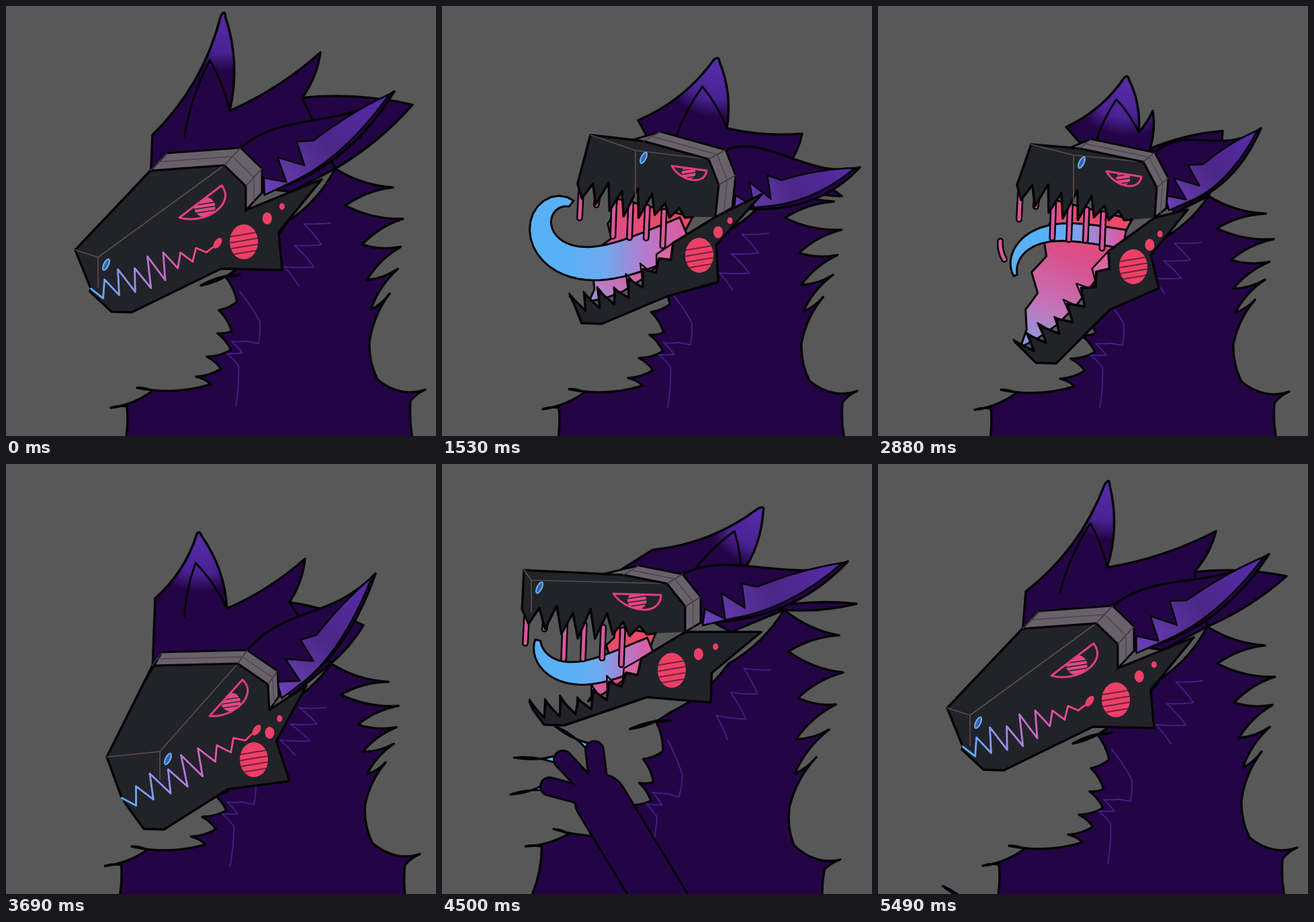
These frames come from a looping animation (640 px wide and 640 px high, 5.58 s). An HTML page with a canvas:

```html
<!DOCTYPE html>
<html lang="en">
<head>
<meta charset="utf-8">
<title>Creature loop</title>
<style>
html, body { margin: 0; width: 100%; height: 100%; overflow: hidden; background: #585858; }
canvas { display: block; width: 100vw; height: 100vh; }
</style>
</head>
<body>
<canvas id="stage" width="640" height="640"></canvas>
<script>
const ctx = document.getElementById('stage').getContext('2d');
const LOOP = 5580, STEP = 90;
const FUR = '#230545', MASK = '#212329', PINK = '#ee3f68', BLUE = '#58b0f6', INK = '#050307', SEAM = '#594d4c';

// Joints of the rig as x y pairs. lean: dx, dy, angle. gape: opening, upper and lower start of the gums.
// tongue: heading, curl, length, half width.
const calm = {
  brow: [103, 363, 215, 245, 325, 237, 357, 268, 357, 304],
  lip: [129, 428, 308, 359],
  jaw: [125, 425, 157, 455, 320, 391, 411, 393, 470, 258],
  nose: [137, 374], eye: [258, 315, 321, 267], cheek: [354, 351],
  horn: [218, 192, 326, 4, 333, 156, 468, 69], ears: [578, 127, 605, 147],
  rim: [24, -26], nape: [0, 0], lean: [0, 0, 0],
  gape: [0, .35, .15], tongue: [2.75, 4.2, 330, 27]
};
const grin = { ...calm,
  brow: [103, 378, 215, 247, 320, 240, 357, 268, 357, 302],
  lip: [127, 438, 313, 362],
  jaw: [140, 445, 158, 467, 325, 393, 411, 391, 470, 245],
  nose: [142, 382], eye: [260, 320, 323, 268], cheek: [357, 354],
  horn: [215, 200, 284, 3, 325, 152, 441, 60], ears: [567, 112, 593, 147],
  nape: [-2, -5], lean: [-5, 2, 0]
};
const howl = { ...calm,
  brow: [221, 192, 300, 201, 397, 228, 412, 266, 407, 314],
  lip: [200, 272, 373, 314],
  jaw: [196, 442, 208, 472, 335, 432, 411, 411, 476, 280],
  nose: [288, 215], eye: [342, 238, 394, 245], cheek: [383, 371],
  horn: [292, 170, 412, 74, 424, 182, 536, 190], ears: [622, 240, 595, 283],
  rim: [25, -14], nape: [14, 20], lean: [-6, 2, 0], gape: [1, .35, .15]
};
const roar = { ...calm,
  brow: [228, 206, 300, 212, 395, 232, 415, 270, 412, 315],
  lip: [205, 274, 378, 318],
  jaw: [212, 508, 235, 531, 345, 452, 418, 420, 461, 303],
  nose: [291, 222], eye: [340, 246, 392, 254], cheek: [380, 388],
  horn: [280, 180, 372, 102, 388, 188, 409, 156], ears: [570, 182, 513, 186],
  rim: [17, -14], nape: [14, 38], lean: [-12, 3, 0], gape: [1, .33, 0], tongue: [3.3, -2.2, 210, 14]
};
const bow = { ...calm,
  brow: [150, 436, 218, 300, 345, 297, 390, 328, 392, 366],
  lip: [176, 504, 366, 402],
  jaw: [176, 503, 205, 543, 330, 484, 422, 472, 447, 330],
  nose: [229, 428], eye: [303, 375, 352, 321], cheek: [369, 440],
  horn: [222, 200, 288, 98, 329, 215, 445, 141], ears: [550, 163, 532, 240],
  rim: [14, -20], nape: [-5, 48], lean: [-8, 5, .02], gape: [0, .7, .5]
};
const bite = { ...calm,
  brow: [122, 158, 270, 165, 335, 178, 362, 212, 362, 250],
  lip: [118, 224, 318, 252],
  jaw: [135, 365, 152, 388, 305, 347, 400, 355, 475, 250],
  nose: [133, 173], eye: [255, 193, 326, 195], cheek: [342, 307],
  horn: [313, 128, 481, 62, 445, 165, 485, 166], ears: [604, 145, 617, 208],
  rim: [23, -14], nape: [17, -31], lean: [-30, -5, .1], gape: [1, .7, .5], tongue: [2.75, 2.2, 210, 20]
};
const settle = { ...calm, horn: [220, 190, 345, 20, 341, 154, 503, 100], ears: [582, 134, 608, 167] };

const KEYS = [[0, calm], [720, grin], [1530, howl], [2880, roar], [3690, bow], [4140, calm],
  [4500, bite], [4950, bite], [5490, settle], [LOOP, calm]];

const ease = k => k * k * (3 - 2 * k);
const clamp = v => Math.max(0, Math.min(1, v));
const mix = (a, b, k) => a.map((v, i) => v + (b[i] - v) * k);
const add = (p, x, y) => [p[0] + x, p[1] + y];
const range = n => [...Array(n).keys()];
const pairs = list => range(list.length / 2).map(i => list.slice(2 * i, 2 * i + 2));
const random = i => { const v = Math.sin(i * 12.9898 + 4) * 43758.5; return v - Math.floor(v); };

function poseAt(t) {
  const i = KEYS.findIndex((key, n) => t < KEYS[n + 1][0]);
  const [t0, a] = KEYS[i], [t1, b] = KEYS[i + 1], k = ease((t - t0) / (t1 - t0));
  return Object.fromEntries(Object.keys(a).map(name => [name, mix(a[name], b[name], k)]));
}

// Sides bow towards the inside of a clockwise shape when bend is positive.
function outline(points, bend = 0, closed = false) {
  const path = new Path2D(), all = closed ? [...points, points[0]] : points;
  path.moveTo(...points[0]);
  for (let i = 1; i < all.length; i++) {
    const [x0, y0] = all[i - 1], [x, y] = all[i];
    path.quadraticCurveTo((x0 + x) / 2 - (y - y0) * bend, (y0 + y) / 2 + (x - x0) * bend, x, y);
  }
  return path;
}

function ellipse(x, y, rx, ry, tilt = 0) {
  const path = new Path2D();
  path.ellipse(x, y, rx, ry, tilt, 0, 7);
  return path;
}

function paint(path, fill, line = INK, width = 3.5) {
  if (fill) { ctx.fillStyle = fill; ctx.fill(path); }
  if (line) { ctx.strokeStyle = line; ctx.lineWidth = width; ctx.stroke(path); }
}

function within(path, draw) {
  ctx.save();
  ctx.clip(path);
  draw();
  ctx.restore();
}

function ramp([x0, y0], [x1, y1], ...colors) {
  const g = ctx.createLinearGradient(x0, y0, x1, y1);
  colors.forEach((c, i) => g.addColorStop(i / (colors.length - 1), c));
  return g;
}

// Uneven teeth along a curve; height gives their reach at each place.
function zigzag(curve, count, height) {
  const [x0, y0] = curve(0), [x1, y1] = curve(1), len = Math.hypot(x1 - x0, y1 - y0) || 1;
  return range(2 * count + 1).map(i => {
    const k = i / (2 * count), reach = height(k) * (.65 + .7 * random(i)) * (i % 2 ? 1 : -1);
    return add(curve(k), -(y1 - y0) / len * reach, (x1 - x0) / len * reach);
  });
}

// A tuft of fur at every valley, its tip drifting from one offset to the other.
const tufts = (valleys, from, to) => valleys.map((v, i) => {
  const offset = mix(from, to, i / (valleys.length - 1));
  return [add(v, ...offset), v];
});

function drawBody(p) {
  const [dx, dy, angle] = p.lean, c = Math.cos(angle), s = Math.sin(angle);
  const settleOn = ([x, y]) => {
    const neck = clamp((460 - y) / 200), u = x - 395, v = y - 570;
    return [395 + u * c - v * s + dx + p.nape[0] * neck, 570 + u * s + v * c + dy + p.nape[1] * neck];
  };
  const chest = pairs([180, 596, 218, 573, 305, 563, 320, 540, 335, 512, 336, 484, 344, 440]);
  const back = pairs([505, 297, 530, 355, 537, 408, 543, 452, 541, 500]);
  const front = tufts(chest, [-24, 2], [-18, -38]).flatMap(([tip, valley]) => [valley, tip]);
  const rear = tufts(back, [71, -27], [30, -72]).flat();
  const shape = [[165, 690], ...front, [348, 400], [290, 416], [345, 390], [420, 320], [490, 242],
    ...rear, [553, 556], [590, 574], [624, 571], [602, 588], [620, 690]].map(settleOn);
  paint(outline(shape, .13), FUR);

  const mark = points => paint(outline(points.map(settleOn), -.05), null, '#41208a', 1.8);
  mark(zigzag(k => mix([468, 316], [425, 412], k), 3, () => 17));
  mark([[348, 425], [378, 470], [376, 502], ...zigzag(k => mix([350, 495], [335, 530], k), 2, () => 10), [342, 595]]);
  return settleOn([490, 242]);
}

function drawHair(p, band, nape) {
  const [base, tip, valley, crest] = pairs(p.horn), [earTip, tuftTip] = pairs(p.ears);
  const brow = pairs(p.brow), spike = pairs(p.jaw)[4];
  const notch = add(mix(crest, valley, .2), 0, 50);
  paint(outline([notch, tuftTip, nape], -.08), FUR);

  const [left, right] = [mix(tip, base, .06), mix(tip, valley, .08)];
  const hair = new Path2D();
  hair.moveTo(...mix(band[0], band[1], .5));
  hair.lineTo(...base);
  const side = (a, b, bend) => hair.quadraticCurveTo((a[0] + b[0]) / 2 - (b[1] - a[1]) * bend,
    (a[1] + b[1]) / 2 + (b[0] - a[0]) * bend, ...b);
  side(base, left, .14);
  hair.quadraticCurveTo(...tip, ...right);
  side(right, valley, -.14);
  side(valley, crest, .08);
  side(crest, notch, -.12);
  for (const point of [nape, mix(spike, brow[4], .4), brow[3]]) hair.lineTo(...point);
  const glow = ctx.createRadialGradient(...tip, 15, ...tip, 92);
  glow.addColorStop(0, '#562ba8');
  glow.addColorStop(.65, '#482291');
  glow.addColorStop(1, FUR);
  paint(hair, glow);
  const middle = mix(base, valley, .5);
  paint(outline([add(middle, -10, 20), mix(tip, middle, .45), valley], -.08), null, INK, 3);

  drawEar(band[2], earTip, band[4]);
}

function drawEar(root, tip, low) {
  const ear = new Path2D(), center = mix(tip, low, .5);
  ear.moveTo(...root);
  ear.bezierCurveTo(...add(mix(root, tip, .3), 0, -32), ...add(mix(root, tip, .65), 0, 30), ...tip);
  ear.quadraticCurveTo(...add(center, 25, 45), ...low);
  paint(ear, FUR);

  const notch = add(mix(low, tip, .4), -5, -20), end = mix(tip, notch, .06), inner = new Path2D();
  const jagged = zigzag(k => mix(low, notch, k), 3, k => -17 * Math.sin(Math.PI * (k * .8 + .1)));
  jagged.forEach(q => inner.lineTo(...q));
  inner.quadraticCurveTo(...add(mix(notch, end, .5), 0, -6), ...end);
  inner.quadraticCurveTo(...add(center, 22, 26), ...add(mix(low, tip, .15), 12, 8));
  inner.closePath();
  paint(inner, ramp(end, low, '#572bab', '#4b2787', '#6c40b8'), INK, 2.5);
}

// A ribbon whose heading turns ever faster towards its tip.
function tongueShape([x, y], [heading, curl, length, width], open) {
  const left = [], right = [], n = 36;
  for (const i of range(n)) {
    const s = i / (n - 1), a = heading + curl * s ** 3, w = width * open * (1 - .8 * s ** 3);
    left.push([x + Math.sin(a) * w, y - Math.cos(a) * w]);
    right.unshift([x - Math.sin(a) * w, y + Math.cos(a) * w]);
    x += Math.cos(a) * length * open / n;
    y += Math.sin(a) * length * open / n;
  }
  return outline([...left, ...right], 0, true);
}

function drawHead(p, band) {
  const brow = pairs(p.brow), [front, corner] = pairs(p.lip);
  const [jawFront, chin, throat, heel, spike] = pairs(p.jaw);
  const [open, gumTop, gumLow] = p.gape;
  const lip = k => mix(front, corner, k);
  const hinge = add(mix(corner, p.cheek, .5), -30, 18);
  const lower = k => mix(add(lip(k), 0, -25), add(mix(jawFront, hinge, k), 0, 22 * Math.sin(Math.PI * k)), open);
  const teeth = zigzag(lip, 8, k => 18 * Math.sin(Math.PI * (.15 + .85 * k)));
  const fangs = zigzag(lower, 7, k => 13 * open * (1 - k * .5));

  if (open > .01) {
    const floor = range(6).map(i => lower(1 - (1 - gumLow) * i / 5));
    const edge = zigzag(k => mix(lower(gumLow), lip(gumTop), k), 4, k => 7 * Math.sin(Math.PI * k));
    paint(outline([lip(gumTop), corner, ...floor, ...edge], 0, true),
      ramp(lip(.6), add(lower(0), 0, 10), '#ee4868', '#d9508c', '#c276bb', '#78a5ec'), INK, 3);
    const root = add(mix(corner, hinge, .55), 5, 0);
    paint(tongueShape(root, p.tongue, open),
      ramp(add(root, -p.tongue[2] * .56, 0), root, BLUE, '#6eaaf0', '#b57acb', '#e0589d'), INK, 3);
    const gums = zigzag(k => lower(k * .85), 6, () => 16 * open);
    paint(outline([...gums, ...[...fangs].reverse()]), ramp(jawFront, hinge, '#9fa4ec', '#c58fd0', '#de5c98'), INK, 2.5);
  }

  const notch = add(mix(heel, spike, .42), -30, 0);
  paint(outline([jawFront, chin, add(chin, 30, 1), throat, heel, notch, spike, brow[4],
    ...fangs.reverse()], 0, true), MASK);

  for (const [color, width] of [[INK, 10], ['#d8569c', 5]])
    for (const i of range(6)) {
      const top = add(lip(i / 7 + .04), 0, 2), drop = open * (14 + 46 * random(i + 5) ** 2);
      if (open > .1) paint(outline([top, add(top, -2, drop)]), null, color, width);
    }
  paint(outline([...[...teeth].reverse(), ...brow]), MASK);

  const foot = lip(clamp((p.nose[0] - front[0]) / (corner[0] - front[0])));
  paint(outline([brow[0], p.nose, brow[2]]), null, SEAM, 1.7);
  paint(outline([p.nose, add(foot, 0, -6)]), null, SEAM, 1.7);

  ctx.globalAlpha = clamp(1 - open * 4);
  paint(outline(teeth), null, ramp(front, corner, BLUE, '#9b8be8', '#d65cb4', PINK), 3);
  paint(ellipse(...add(corner, 7, -6), 5, 9, .6), PINK, null);
  ctx.globalAlpha = 1;

  const inside = brow.slice(1);
  paint(outline([...band, ...inside.reverse()], 0, true), '#68616c', INK, 3);
  for (const i of [1, 2, 3]) paint(outline([band[i], brow[i]]), null, '#3d3840', 1.5);
  paint(outline(band.slice(1).map((q, i) => mix(q, brow[i + 1], .5))), null, '#4b454f', 1.3);

  drawEye(...pairs(p.eye));
  paint(ellipse(...add(p.nose, 12, 11), 3.5, 9, .45), '#405fa5', '#65b5f5', 2);
  drawCheek(p.cheek, spike);
}

function drawEye(a, b) {
  const [dx, dy] = [b[0] - a[0], b[1] - a[1]], size = Math.hypot(dx, dy), eye = new Path2D();
  eye.moveTo(...a);
  eye.lineTo(...b);
  eye.bezierCurveTo(...add(b, -dy * .45, dx * .45), ...add(a, dx * .3 - dy * .4, dy * .3 + dx * .4), ...a);
  eye.closePath();
  const [x, y] = add(mix(a, b, .5), -dy * .13, dx * .13);
  within(eye, () => {
    paint(ellipse(x, y, size * .2, size * .19), '#e04a80', null);
    for (const i of [-1, 0, 1]) paint(outline([[x - 20, y + i * 6 + 4], [x + 20, y + i * 6 - 2]]), null, MASK, 1.5);
  });
  paint(eye, null, '#e23c83', 3);
}

function drawCheek([x, y], spike) {
  paint(ellipse(...add(mix([x, y], spike, .3), 0, -7), 7, 9), PINK, null);
  paint(ellipse(...add(mix([x, y], spike, .49), 0, -7), 4, 5), PINK, null);
  const lamp = ellipse(x, y, 21, 26);
  paint(lamp, PINK, null);
  within(lamp, () => {
    for (const i of range(4)) paint(outline([[x - 24, y + i * 9 - 7], [x + 24, y + i * 9 - 15]]), null, '#6f2038', 2);
  });
}

function drawHand(t) {
  if (t < 4050) return;
  const away = t < 4500 ? 1 - ease(clamp((t - 4050) / 450)) : ease(clamp((t - 4950) / 540));
  const palm = [236, 500];
  const fingers = [[227, 426, 168, 390], [180, 440, 107, 437], [160, 480, 102, 492]].map(pairs);
  ctx.save();
  ctx.translate(-72 * away, 238 * away);
  for (const [[x, y], tip] of fingers) {
    const n = mix([0, 0], [-(tip[1] - y), tip[0] - x], .13);
    paint(outline([[x - n[0], y - n[1]], tip, [x + n[0], y + n[1]]], .14, true), BLUE, INK, 3);
  }
  for (const [color, extra] of [[INK, 6], [FUR, 0]]) {
    paint(outline([palm, [345, 680]]), null, color, 74 + extra);
    fingers.forEach(([knuckle]) => paint(outline([palm, knuckle]), null, color, 24 + extra));
  }
  ctx.restore();
}

function drawDroplet(t) {
  const u = (t - 2610) / 540;
  if (u < 0 || u > 1) return;
  const x = 258 - 148 * u, y = 322 + 66 * u;
  for (const [color, width] of [[INK, 10], ['#d8569c', 5]])
    paint(outline([[x - 2, y - 5], [x + 4, y + 22]], .15), null, color, width);
}

function draw(now) {
  const t = Math.floor(now % LOOP / STEP) * STEP, p = poseAt(t);
  const brow = pairs(p.brow);
  const band = [mix(brow[1], brow[0], .2), ...brow.slice(1).map(q => add(q, ...p.rim))];
  ctx.fillStyle = '#585858';
  ctx.fillRect(0, 0, 640, 640);
  ctx.lineJoin = ctx.lineCap = 'round';
  const nape = drawBody(p);
  drawHair(p, band, nape);
  drawHead(p, band);
  drawDroplet(t);
  drawHand(t);
}

const start = performance.now();
function tick() {
  draw(performance.now() - start);
  requestAnimationFrame(tick);
}
tick();
</script>
</body>
</html>
```
